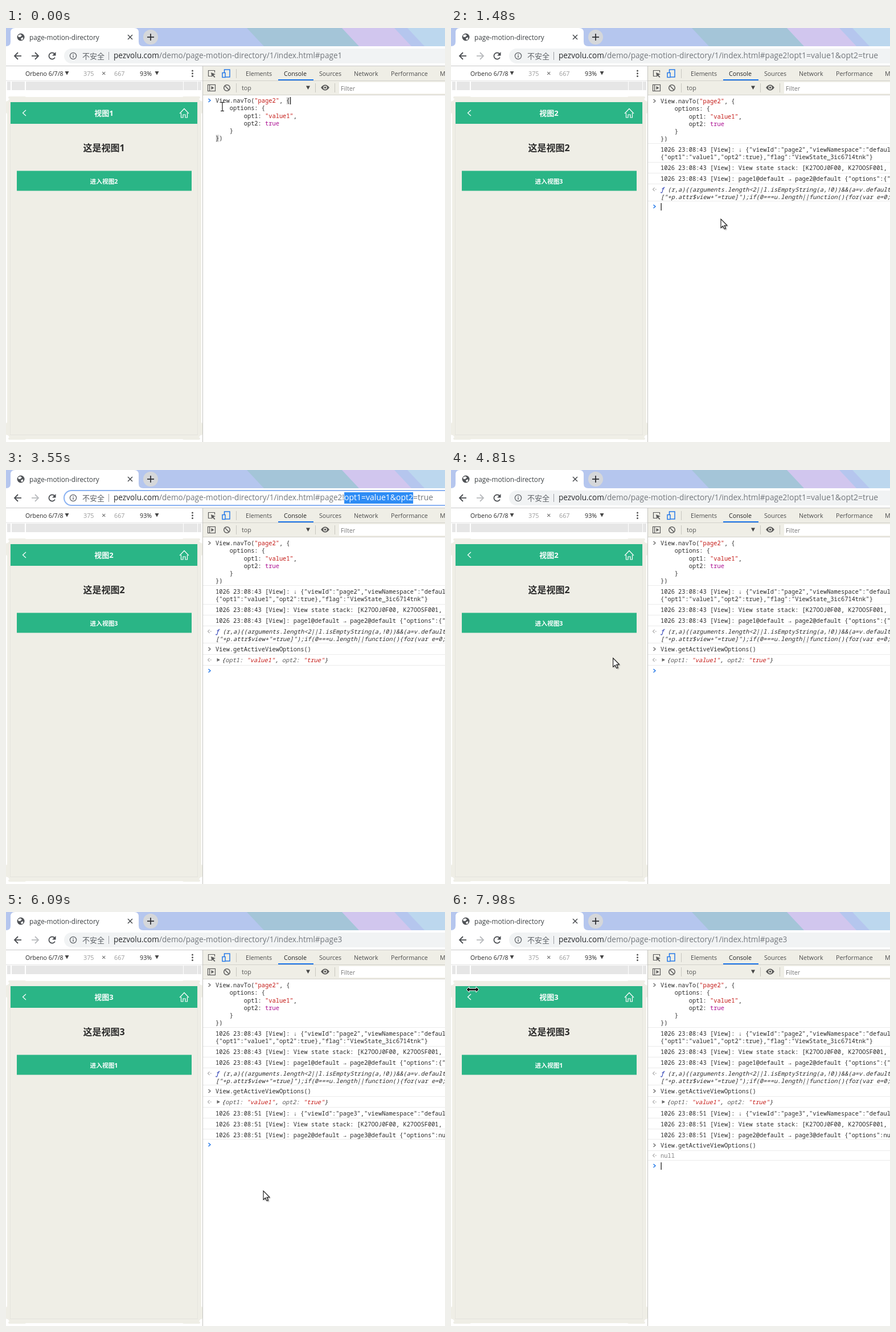
An HTML page with a canvas that plays this animation: 771x726 px, repeating every 8000 ms.

```html
<!DOCTYPE html>
<html lang="zh">
<head>
<meta charset="utf-8">
<title>Page views</title>
<style>
html, body { margin: 0; width: 100%; height: 100%; overflow: hidden; background: #fff; }
canvas { display: block; }
</style>
</head>
<body>
<canvas id="stage" width="771" height="726"></canvas>
<script>
const g = document.getElementById('stage').getContext('2d');
const LOOP = 8000;
const UI = '"Open Sans","Noto Sans CJK SC","Noto Sans CJK",sans-serif';
const MONO = '500 10.37px "Noto Sans Mono","DejaVu Sans Mono",monospace';
const CREAM = '#efeee6', GREEN = '#2ab586', INK = '#2a2a2a', GREY = '#6e6e6e';
const RED = '#c41a16', PURPLE = '#aa0d91', BLUE = '#1a73e8';
const CALL = 'View.getActiveViewOptions()';

// Moments of the session, in ms
const NAV2 = 460, RECALL1 = 1700, ENTER2 = 2140, NAV3 = 5490, RECALL2 = 6450, ENTER3 = 6950;
const SLIDE = 400;
const FOCUS = [3190, 4110], DRAG = [3250, 3670];

// Pointer path: time, x, y
const PATH = [
  [0, 380, 138], [700, 380, 138], [1180, 395, 158], [1240, 400, 170], [1480, 474, 335],
  [1640, 474, 335], [2020, 450, 374], [2390, 446, 364], [2650, 446, 364], [3180, 596, 48],
  [3250, 596, 48], [3550, 718, 48], [3670, 752, 48], [3820, 752, 48], [4170, 380, 341],
  [4570, 380, 341], [4810, 285, 330], [5270, 114, 272], [5660, 114, 272], [6060, 452, 489],
  [7080, 452, 489], [7680, 240, 310], [7740, 234, 305], [7960, 38, 136], [8000, 38, 136]
];

function rect(x, y, w, h, color) {
  g.fillStyle = color;
  g.fillRect(x, y, w, h);
}

function text(s, x, y, size, color, weight = 400, align = 'left') {
  g.font = `${weight} ${size}px ${UI}`;
  g.fillStyle = color;
  g.textAlign = align;
  g.fillText(s, x, y);
  return x + g.measureText(s).width;
}

function trace(points, close) {
  g.beginPath();
  points.forEach(([x, y], i) => i ? g.lineTo(x, y) : g.moveTo(x, y));
  if (close) g.closePath();
}

function stroke(points, color, width = 1, close = false) {
  trace(points, close);
  g.strokeStyle = color;
  g.lineWidth = width;
  g.stroke();
}

function fill(points, color) {
  trace(points, true);
  g.fillStyle = color;
  g.fill();
}

function ring(x, y, r, color, width = 1, a = 0, b = Math.PI * 2) {
  g.beginPath();
  g.arc(x, y, r, a, b);
  g.strokeStyle = color;
  g.lineWidth = width;
  g.stroke();
}

function dot(x, y, r, color) {
  g.beginPath();
  g.arc(x, y, r, 0, Math.PI * 2);
  g.fillStyle = color;
  g.fill();
}

function round(x, y, w, h, r, color) {
  g.beginPath();
  g.roundRect(x, y, w, h, r);
  g.fillStyle = color;
  g.fill();
}

const within = (t, [a, b]) => t >= a && t < b;

function drawTabStrip() {
  rect(0, 0, 771, 32, '#b5c6ee');
  const bands = [[423, 167, '#a4c5d8'], [590, 92, '#d1c6ee'], [705, 70, '#bcd7ee']];
  for (const [x, w, c] of bands) fill([[x, 0], [x + w, 0], [x + w + 30, 32], [x + 30, 32]], c);

  g.beginPath();
  g.moveTo(0, 32);
  g.quadraticCurveTo(8, 32, 8, 24);
  g.lineTo(8, 8);
  g.quadraticCurveTo(8, 0, 16, 0);
  g.lineTo(225, 0);
  g.quadraticCurveTo(233, 0, 233, 8);
  g.lineTo(233, 24);
  g.quadraticCurveTo(233, 32, 241, 32);
  g.fillStyle = '#fff';
  g.fill();

  dot(26, 16, 6.5, '#505357');
  fill([[21, 13], [25, 11], [28, 13], [25, 16], [22, 16]], '#fff');
  fill([[26, 18], [30, 16], [30, 20], [27, 21]], '#fff');
  text('page-motion-directory', 41, 20.5, 11.75, '#3c4043');
  stroke([[214, 12], [222, 20]], '#45484c', 1.5);
  stroke([[222, 12], [214, 20]], '#45484c', 1.5);
  dot(254, 16, 13, '#d5d7da');
  stroke([[248, 16], [260, 16]], '#303236', 1.8);
  stroke([[254, 10], [254, 22]], '#303236', 1.8);
}

function drawArrow(x, dir, color) {
  stroke([[x - 6 * dir, 49], [x + 6 * dir, 49]], color, 1.8);
  stroke([[x, 43], [x + 6 * dir, 49], [x, 55]], color, 1.8);
}

function drawAddress(t) {
  rect(0, 32, 771, 35, '#fff');
  drawArrow(21, -1, '#4a4d51');
  drawArrow(51, 1, t < NAV2 ? '#4a4d51' : '#b9bbbe');
  ring(81, 49, 5.6, '#4a4d51', 1.8, 0.5, 5.6);
  fill([[87.5, 42], [87.5, 48.5], [81, 48.5]], '#4a4d51');

  const focused = within(t, FOCUS);
  round(102, 36, 700, 26, 13, focused ? '#fff' : '#f1f3f4');
  if (focused) {
    g.strokeStyle = '#8ab2f2';
    g.lineWidth = 2;
    g.stroke();
  }
  ring(118, 49, 5.6, '#5f6368', 1.3);
  rect(117.3, 48, 1.4, 4, '#5f6368');
  rect(117.3, 45.4, 1.4, 1.5, '#5f6368');
  text('不安全', 134, 53.5, 13, '#5f6368');
  rect(180, 42, 1, 14, '#9a9da1');

  const page = t < NAV2 ? 1 : t < NAV3 ? 2 : 3;
  let x = text('pezvolu.com', 189, 53, 13.6, '#26282b');
  x = text('/demo/page-motion-directory/1/index.html#page' + page, x, 53, 13.6, '#73777c');
  if (page === 2) {
    x = text('!', x, 53, 14, '#73777c');
    const query = 'opt1=value1&opt2=true';
    text(query, x, 53, 14, '#73777c');
    if (focused) {
      const k = Math.min(1, Math.max(0, (t - DRAG[0]) / (DRAG[1] - DRAG[0])));
      const part = query.slice(0, Math.round(k * 22));
      g.font = `400 14px ${UI}`;
      rect(x, 39, g.measureText(part).width, 20, '#2e8cf5');
      text(part, x, 53, 14, '#fff');
    }
  }
  rect(0, 66, 771, 1, '#c9c9c9');
}

function caretDown(x, y) {
  fill([[x - 3.5, y - 3], [x + 3.5, y - 3], [x, y + 3.5]], '#444');
}

function drawDeviceBar() {
  rect(0, 67, 345, 659, '#fff');
  text('Orbeno 6/7/8', 34, 83.5, 10.6, INK);
  caretDown(107, 79);
  text('375', 136, 83.5, 10.8, '#9a9a9a');
  text('×', 168, 84, 13, '#555');
  text('667', 190, 83.5, 10.8, '#9a9a9a');
  text('93%', 235, 83.5, 10.8, INK);
  caretDown(265, 79);
  for (let i = 0; i < 3; i++) dot(327.5, 75 + i * 4.7, 1.5, '#555');
  rect(0, 92, 345, 1, '#e3e3e3');
  [[2, 6], [10, 23], [35, 276], [312, 24], [337, 6]].forEach(([x, w]) => rect(x, 94, w, 15, '#e6e6e6'));
}

function drawPhoneFrame() {
  round(2, 121, 341, 600, 13, CREAM);
  for (const x of [4, 310]) for (const y of [120, 718]) round(x, y, 31, 4, 2, CREAM);
  for (const x of [0, 340]) for (const y of [128, 692]) round(x, y, 5, 22, 2, CREAM);
  rect(7, 130, 1, 584, '#e6e5df');
  rect(336, 130, 1, 584, '#e6e5df');
  rect(7, 713, 330, 1, '#e4e3dd');
}

function drawView(n, dx) {
  g.save();
  g.translate(dx, 0);
  rect(8, 130, 328, 583, CREAM);
  rect(8, 130, 328, 38, GREEN);
  stroke([[35, 144], [29.5, 149], [35, 154]], '#fff', 1.2);
  text('视图' + n, 172, 154, 13, '#fff', 700, 'center');
  stroke([[305, 150], [313, 141.5], [321, 150]], '#fff', 1.2);
  stroke([[307.5, 149], [307.5, 157], [311, 157], [311, 152], [315, 152], [315, 157], [318.5, 157], [318.5, 149]], '#fff', 1.2);
  text('这是视图' + n, 172, 216, 16, '#2c2c2c', 700, 'center');
  rect(19, 250.5, 307, 35, GREEN);
  text('进入视图' + (n % 3 + 1), 172, 272.5, 10.7, '#fff', 700, 'center');
  g.restore();
}

function drawPhone(t) {
  drawPhoneFrame();
  const n = t < NAV2 ? 1 : t < NAV3 ? 2 : 3;
  const since = n === 1 ? SLIDE : t - (n === 2 ? NAV2 : NAV3);
  const left = 328 * Math.pow(1 - Math.min(1, since / SLIDE), 3);
  g.save();
  g.beginPath();
  g.rect(8, 130, 328, 583);
  g.clip();
  if (left > 0) drawView(n - 1, left - 328);
  drawView(n, left);
  g.restore();
}

function drawTools() {
  rect(346, 67, 425, 50, CREAM);
  rect(346, 92, 425, 1, '#d2d1ca');
  rect(346, 117, 425, 1, '#d2d1ca');
  rect(345, 67, 1, 659, '#c4c4c0');

  stroke([[361, 84.5], [355.5, 84.5], [355.5, 74.5], [366.5, 74.5], [366.5, 78]], '#5a5a5a', 1.2);
  fill([[360, 78], [368, 81], [364.5, 82.5], [367.5, 86], [366, 87], [363, 83.5], [361.5, 86]], '#5a5a5a');
  g.strokeStyle = BLUE;
  g.lineWidth = 1.4;
  g.strokeRect(383.5, 73, 9.5, 13);
  rect(379, 78, 6.5, 9, CREAM);
  g.strokeRect(380, 78.5, 5, 8);
  rect(404, 72, 1, 16, '#c8c7c0');
  const tabs = [['Elements', 421], ['Console', 488], ['Sources', 550], ['Network', 611], ['Performance', 676], ['Memory', 762]];
  for (const [s, x] of tabs) text(s, x, 84, 10.7, s === 'Console' ? '#222' : '#4c4c4c');
  rect(478, 90, 62, 2, BLUE);

  g.strokeStyle = '#5a5a5a';
  g.lineWidth = 1.2;
  g.strokeRect(354.5, 99.5, 13, 11);
  rect(357, 99, 1.2, 12, '#5a5a5a');
  fill([[360.5, 102], [365.5, 105], [360.5, 108]], '#5a5a5a');
  ring(388, 105, 5.3, '#5a5a5a', 1.5);
  stroke([[384.3, 101.3], [391.7, 108.7]], '#5a5a5a', 1.5);
  for (const x of [404, 543, 577]) rect(x, 97, 1, 16, '#c8c7c0');
  text('top', 414, 109, 10.7, '#555');
  caretDown(530.5, 104.5);
  g.beginPath();
  g.moveTo(553, 104.5);
  g.quadraticCurveTo(560.5, 94.5, 568, 104.5);
  g.quadraticCurveTo(560.5, 114.5, 553, 104.5);
  g.fillStyle = '#5a5a5a';
  g.fill();
  dot(560.5, 104.5, 3.2, CREAM);
  dot(560.5, 104.5, 1.8, '#5a5a5a');
  rect(585, 95, 186, 20, '#fff');
  text('Filter', 588, 109.5, 10.7, '#777');
}

// Runs are text and colour in turn
function code(x, y, runs, italic) {
  g.font = (italic ? 'italic ' : '') + MONO;
  g.textAlign = 'left';
  for (let i = 0; i < runs.length; i += 2) {
    g.fillStyle = runs[i + 1];
    g.fillText(runs[i], x, y + 4);
    x += g.measureText(runs[i]).width;
  }
  return x;
}

const line = (y, s) => code(368, y, [s, INK]);
const rule = y => rect(346, y, 425, 1, '#ebebeb');

function mark(y, color) {
  stroke([[355.5, y - 3], [359, y], [355.5, y + 3]], color, 1.4);
}

function reply(y) {
  stroke([[357.5, y - 3], [354.5, y], [357.5, y + 3]], '#aaa', 1.1);
  rect(359, y - 0.7, 1.5, 1.5, '#aaa');
}

function log(y, time, s) {
  line(y, `1026 23:08:${time} [View]: ${s}`);
}

function drawCall(y) {
  const step = 13.25;
  const rows = [
    ['View.navTo(', INK, '"page2"', RED, ', {', INK],
    ['    options: {', INK],
    ['        opt1: ', INK, '"value1"', RED, ',', INK],
    ['        opt2: ', INK, 'true', PURPLE],
    ['    }', INK],
    ['})', INK]
  ];
  rows.forEach((r, i) => code(368, y + i * step, r));
}

function drawPrompt(y, typed, caret) {
  mark(y, BLUE);
  const x = typed ? line(y, CALL) : 368;
  if (caret) rect(x + 0.5, y - 6, 1.3, 13, '#222');
}

function drawConsole(t) {
  rect(346, 118, 425, 608, '#fff');
  if (t < NAV2) {
    rect(492.5, 121, 6.5, 13, '#dcdcdc');
    rect(368.5, 187, 6, 13, '#dcdcdc');
    drawCall(127);
    mark(127, BLUE);
    rect(499, 121, 1.2, 13, '#222');
    return;
  }
  drawCall(128);
  mark(128, GREY);
  rule(202);
  log(212.5, 43, '↓ {"viewId":"page2","viewNamespace":"default","options":');
  line(226, '{"opt1":"value1","opt2":true},"flag":"ViewState_3ic6714tnk"}');
  rule(235);
  log(244.5, 43, 'View state stack: [K27OOJ0F00, K27OOSF001, K27OOT');
  rule(254);
  log(263.5, 43, 'page1@default → page2@default {"options":{"opt1"');
  rule(273);
  reply(283);
  code(368, 283, ['ƒ', '#0d22aa', ' (r,a){(arguments.length<2||l.isEmptyString(a,!0))&&(a=v.default', INK], true);
  code(368, 296, ['["+p.attr$view+"=true]");if(0===u.length||function(){for(var e=0;e<', INK], true);
  rule(303);

  if (t < ENTER2) {
    drawPrompt(313, t >= RECALL1, t >= 1100);
    return;
  }
  mark(314, GREY);
  line(314, CALL);
  rule(323);
  reply(333);
  fill([[370.5, 330], [376, 333], [370.5, 336]], '#666');
  code(379, 333, ['{', INK, 'opt1: ', '#565656', '"value1"', RED, ', ', INK, 'opt2: ', '#565656', '"true"', RED, '}', INK], true);
  rule(342);
  if (t < NAV3 + 60) {
    drawPrompt(352, false, false);
    return;
  }
  log(352.5, 51, '↓ {"viewId":"page3","viewNamespace":"default","options":');
  rule(361);
  log(371.5, 51, 'View state stack: [K27OOJ0F00, K27OOSF001, K27OOT');
  rule(380);
  log(390.5, 51, 'page2@default → page3@default {"options":null}');
  rule(398);
  if (t < ENTER3) {
    drawPrompt(408, t >= RECALL2, t >= 6270);
    return;
  }
  mark(409, GREY);
  line(409, CALL);
  rule(418);
  reply(427);
  code(368, 427, ['null', '#808080']);
  rule(435);
  drawPrompt(445, false, t < 7250 || t >= 7750);
}

function pointerAt(t) {
  const i = Math.max(1, PATH.findIndex(p => p[0] > t));
  const [t0, x0, y0] = PATH[i - 1], [t1, x1, y1] = PATH[i];
  const k = (t - t0) / (t1 - t0);
  return [x0 + (x1 - x0) * k, y0 + (y1 - y0) * k];
}

function drawPointer(t) {
  if (within(t, [3180, 3850])) return;
  const [x, y] = pointerAt(t);
  g.save();
  g.translate(x, y);
  if (t < 1270) {
    stroke([[0, -7], [0, 7]], '#222', 1.2);
    for (const e of [-7.5, 7.5]) stroke([[-3, e], [3, e]], '#222', 1.2);
  } else if (t > 7910) {
    const arrow = [[-11, 0], [-6, -5], [-6, -2], [6, -2], [6, -5], [11, 0], [6, 5], [6, 2], [-6, 2], [-6, 5]];
    fill(arrow, '#111');
    stroke(arrow, '#fff', 1, true);
  } else {
    const arrow = [[0, 0], [0, 15.5], [3.6, 12.2], [6, 17.6], [8.4, 16.5], [6, 11.3], [10.8, 11]];
    g.shadowColor = 'rgba(0,0,0,.4)';
    g.shadowBlur = 2;
    g.shadowOffsetX = g.shadowOffsetY = 2;
    fill(arrow, '#fff');
    g.shadowColor = 'transparent';
    stroke(arrow, '#111', 1.1, true);
  }
  g.restore();
}

function draw(now) {
  const t = now % LOOP;
  drawTabStrip();
  drawAddress(t);
  drawDeviceBar();
  drawPhone(t);
  drawTools();
  drawConsole(t);
  drawPointer(t);
}

const start = performance.now();
function tick() {
  draw(performance.now() - start);
  requestAnimationFrame(tick);
}
tick();
</script>
</body>
</html>
```
